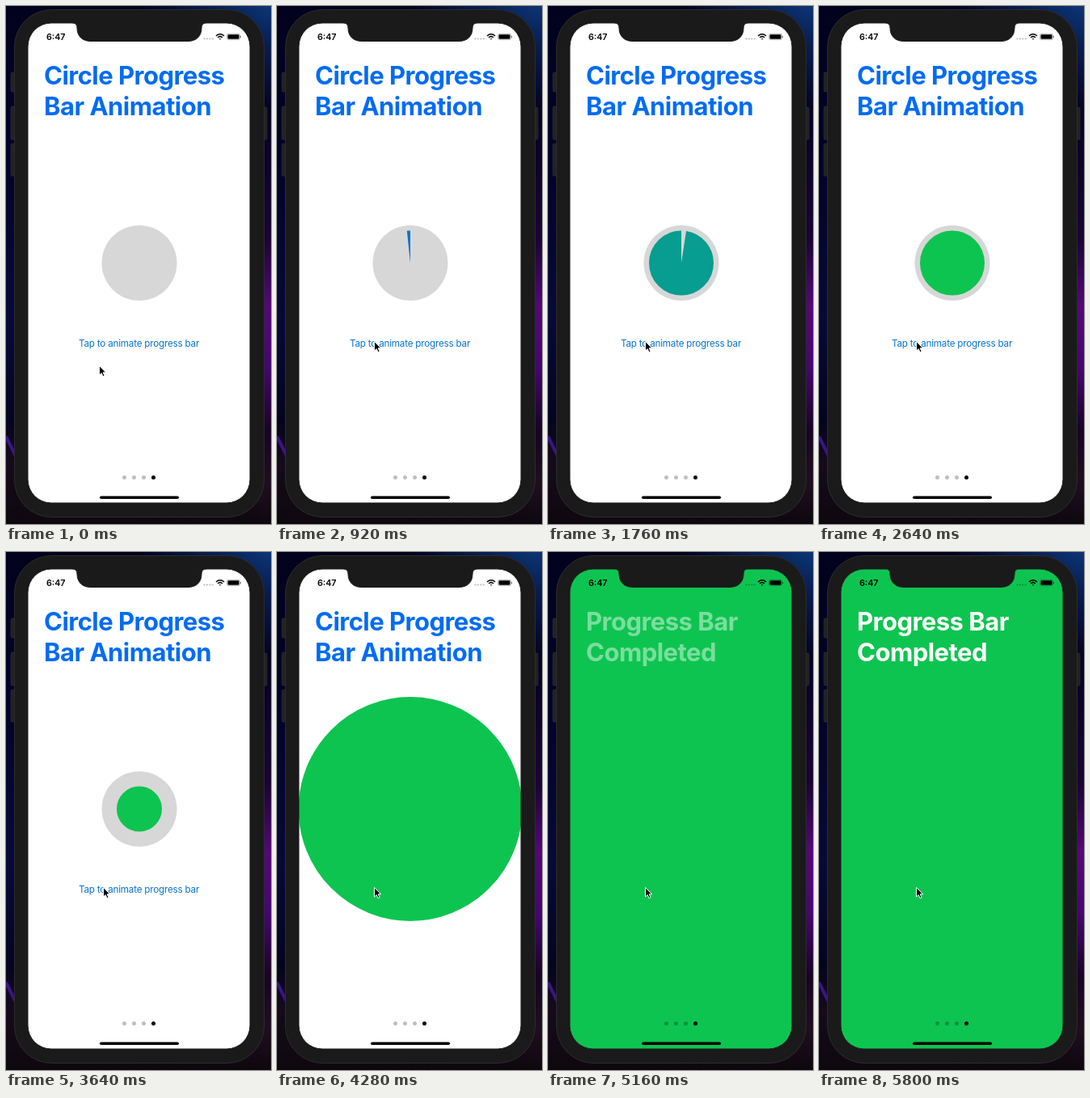
An HTML page that plays this animation: 328x640 px, repeating every 5.84 s.

```html
<!DOCTYPE html>
<html lang="en">
<head>
<meta charset="utf-8">
<title>Circle progress</title>
<style>
html, body { margin: 0; width: 100%; height: 100%; overflow: hidden; background: #08051c }
svg { display: block; width: 328px; height: 640px; font-family: Inter, "Open Sans", sans-serif }
.title { font-size: 31px; font-weight: 700; letter-spacing: -.52px }
.link { font-size: 11.7px; letter-spacing: -.22px; fill: #0874d2 }
.clock { font-size: 10.7px; font-weight: 600 }
</style>
</head>
<body>
<svg viewBox="0 0 328 640">
  <defs>
    <linearGradient id="left" x2="0" y2="1">
      <stop stop-color="#02021e"/><stop offset=".3" stop-color="#030328"/>
      <stop offset=".6" stop-color="#050a38"/><stop offset=".8" stop-color="#05041f"/>
      <stop offset=".88" stop-color="#160a1c"/><stop offset="1" stop-color="#0e080e"/>
    </linearGradient>
    <linearGradient id="right" x2="0" y2="1">
      <stop stop-color="#0c3474"/><stop offset=".08" stop-color="#081c50"/>
      <stop offset=".2" stop-color="#060322"/><stop offset=".45" stop-color="#1a0534"/>
      <stop offset=".58" stop-color="#560878"/><stop offset=".7" stop-color="#460670"/>
      <stop offset=".82" stop-color="#180424"/><stop offset=".92" stop-color="#200e20"/>
      <stop offset="1" stop-color="#0e080e"/>
    </linearGradient>
    <linearGradient id="across">
      <stop offset=".5" stop-color="#fff" stop-opacity="0"/><stop offset=".97" stop-color="#fff"/>
    </linearGradient>
    <mask id="fade"><rect width="328" height="640" fill="url(#across)"/></mask>
    <path id="outline" d="M56 21H82Q88 21 88 27C88 37 94 43.500 105 43.500H225C236 43.500 242 37 242 27Q242 21 248 21H273A29 29 0 0 1 302 50V585A29 29 0 0 1 273 614H56A29 29 0 0 1 27 585V50A29 29 0 0 1 56 21Z"/>
    <clipPath id="screen"><use href="#outline"/></clipPath>
  </defs>

  <rect width="328" height="640" fill="url(#left)"/>
  <rect width="328" height="640" fill="url(#right)" mask="url(#fade)"/>
  <path d="M0 532L12 556" stroke="#3c1488" stroke-width="4"/>

  <g fill="#222224" stroke="#343436" stroke-width=".5">
    <rect x="6" y="82" width="8" height="24" rx="1.500"/>
    <rect x="6" y="124" width="8" height="41" rx="1.500"/>
    <rect x="6" y="170" width="8" height="40" rx="1.500"/>
    <rect x="315" y="125" width="8" height="40" rx="1.500"/>
  </g>
  <rect x="10.500" y="4.500" width="309" height="627" rx="46" fill="#1a1a1a" stroke="#2c2c2e"/>

  <g clip-path="url(#screen)">
    <rect x="27" y="21" width="275" height="593" fill="#fff"/>
    <g class="title" fill="#006cf2">
      <text x="47" y="96.800">Circle Progress</text>
      <text x="47" y="134.500">Bar Animation</text>
    </g>
    <circle cx="165" cy="317.500" r="46.500" fill="#d7d7d7"/>
    <text class="link" x="90" y="421.200">Tap to animate progress bar</text>
    <circle id="pie" r="20" fill="none" stroke-width="40" pathLength="1"/>
    <g id="done" class="title" fill="#fff">
      <text x="47" y="96.800">Progress Bar</text>
      <text x="47" y="134.500">Completed</text>
    </g>

    <text class="clock" x="50" y="41.500">6:47</text>
    <g fill-opacity=".25">
      <path d="M245.500 40.500h12" fill="none" stroke="#000" stroke-opacity=".28" stroke-width="2.200" stroke-linecap="round" stroke-dasharray="0 3.400"/>
      <circle cx="146.500" cy="582.500" r="2.500"/>
      <circle cx="158.500" cy="582.500" r="2.500"/>
      <circle cx="170.500" cy="582.500" r="2.500"/>
    </g>
    <circle cx="182.500" cy="582.500" r="2.500"/>
    <g fill="none" stroke="#000" stroke-width="1.500">
      <path d="M260 37Q265 32.500 270 37M262 39Q265 36.300 268 39"/>
      <path d="M263.600 40.200h2.800L265 41.700Z" fill="#000" stroke="none"/>
    </g>
    <rect x="273.500" y="34.300" width="16" height="7.400" rx="2" fill="none" stroke="#000" stroke-opacity=".4" stroke-width=".7"/>
    <rect x="274.500" y="35.200" width="14" height="5.600" rx="1.200"/>
    <path d="M290.500 37v2.200" stroke="#000" stroke-opacity=".5"/>
    <rect x="116" y="605.500" width="98" height="3.500" rx="1.750"/>
  </g>
  <use href="#outline" fill="none" stroke="#1a1a1a"/>

  <path id="cursor" d="M0 0V11.500L2.700 9.100L4.500 13.200L6.500 12.300L4.700 8.300H8.200Z" stroke="#fff" stroke-linejoin="round"/>
</svg>
<script>
const LOOP = 5840, BLUE = [0, 112, 220], GREEN = [14, 196, 80];
const [pie, done, cursor] = ["pie", "done", "cursor"].map(id => document.getElementById(id));

const mix = (a, b, k) => a + (b - a) * k;
const span = (t, from, to) => Math.min(1, Math.max(0, (t - from) / (to - from)));
const ease = k => k * k * (3 - 2 * k);

function draw(t) {
  const move = ease(span(t, 60, 620));
  cursor.setAttribute("transform", `translate(${mix(115.5, 120.5, move)} ${mix(444.5, 414.5, move)})`);

  const sweep = ease(span(t, 842, 1857));
  const tint = ease(span(t, 842, 2600));
  const shrink = ease(span(t, 2900, 3600));
  const grow = span(t, 3760, 4640) ** 3;
  const scale = mix(mix(1, .7, shrink), 14, grow);
  pie.setAttribute("stroke", `rgb(${BLUE.map((c, i) => mix(c, GREEN[i], tint))})`);
  pie.setAttribute("stroke-dasharray", sweep < 1 ? `${sweep} 2` : "none");
  // Mirrored so that the sweep runs counterclockwise from the top.
  pie.setAttribute("transform", `translate(165 317.5) rotate(-90) scale(${scale} ${-scale})`);

  done.setAttribute("opacity", ease(span(t, 4780, 5600)));
}

function tick() {
  draw(performance.now() % LOOP);
  requestAnimationFrame(tick);
}
tick();
</script>
</body>
</html>
```
